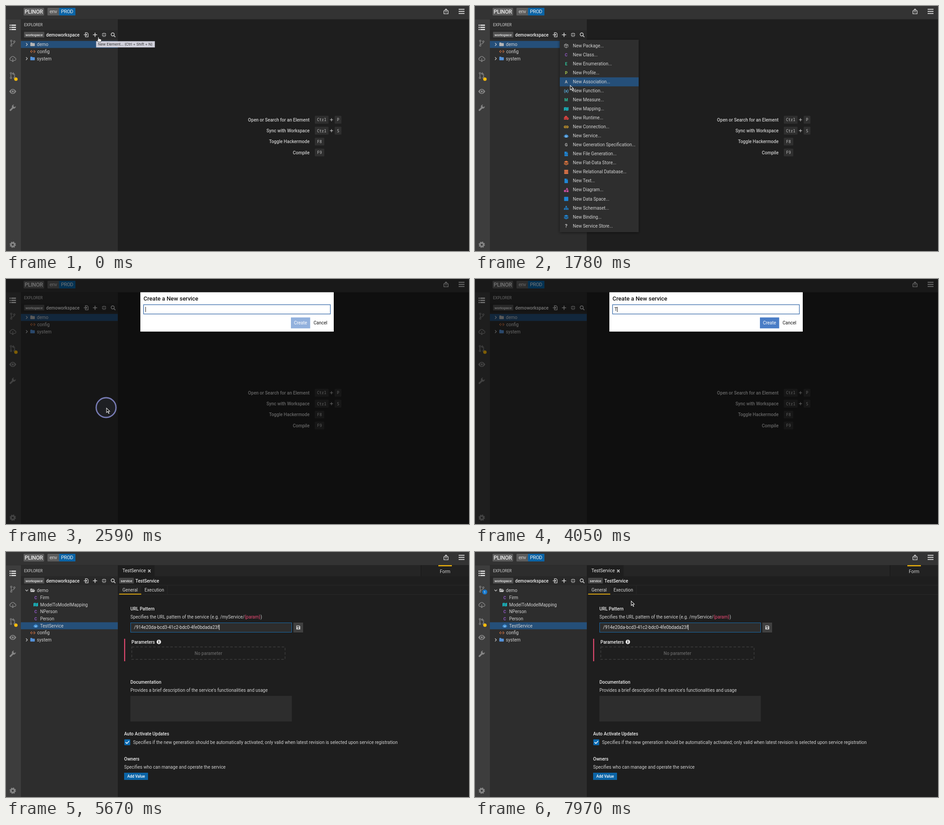
These frames come from a looping animation (1027x545 px, 8 s). An HTML page:

```html
<!DOCTYPE html>
<html lang="en">
<head>
<meta charset="utf-8">
<title>New service</title>
<style>
html, body { margin: 0; width: 100%; height: 100%; overflow: hidden; background: #1e1e1e; }
svg { display: block; width: 100vw; height: 100vh; font-family: Roboto, "Noto Sans", sans-serif; }
.line { fill: none; stroke-linecap: round; stroke-linejoin: round; }
.mono { font-family: "Noto Sans Mono", "DejaVu Sans Mono", monospace; }
.tip { font-family: Inter, "Liberation Sans", sans-serif; }
</style>
</head>
<body>
<svg id="stage" viewBox="0 0 1027 545" preserveAspectRatio="none"></svg>
<script>
const LOOP = 8000, STEP = 80;
const TEXT = '#d2d2d2', BLUE = '#1f86d6', YELLOW = '#fdbc0b';
const stage = document.getElementById('stage');

// Markup helpers
const attrs = o => Object.entries(o).map(([k, v]) => ` ${k}="${v}"`).join('');
const rect = (x, y, w, h, fill, o = {}) =>
  `<rect${attrs({ x, y, width: w, height: h, fill, ...o })}/>`;
const text = (x, y, s, o = {}) =>
  `<text${attrs({ x, y, 'font-size': 10, fill: TEXT, ...o })}>${s}</text>`;
const bold = (x, y, s, o = {}) => text(x, y, s, { 'font-weight': 500, fill: '#ececec', ...o });
const mid = (x, y, s, o = {}) => text(x, y, s, { 'text-anchor': 'middle', ...o });
const circle = (cx, cy, r, fill, o = {}) => `<circle${attrs({ cx, cy, r, fill, ...o })}/>`;
const shape = (d, fill) => `<path d="${d}" fill="${fill}"/>`;
const line = (d, stroke, w = 1, o = {}) =>
  `<path class="line"${attrs({ d, stroke, 'stroke-width': w, ...o })}/>`;
const at = (x, y, body) => `<g transform="translate(${x} ${y})">${body}</g>`;
const layer = (id, body) => `<g id="${id}">${body}</g>`;

// Icons, each drawn around 0,0
const letter = (s, fill, size = 9) => mid(0, 3.3, s, { fill, 'font-size': size, 'font-weight': 700 });
const folder = fill => shape('M-5 -3.2q0-1 1-1h2.6l1.3 1.3h4q1 0 1 1v4.6q0 1-1 1h-8q-1 0-1-1z', fill);
const openFolder = shape('M-5 3V-3.3q0-.8.8-.8h2.8l1.2 1.2h3q.9 0 .9.9v.6h-6.4L-4 3zM-2 -.7H5.6L3.7 3.6H-4.2z', '#c4c4c4');
const chevron = down => line(down ? 'M-2.6 -1.3L0 1.4 2.6 -1.3' : 'M-1.2 -2.8L1.5 0 -1.2 2.8', TEXT, 1.2);
const code = line('M-2.4 -2.6L-5 0l2.6 2.6M2.4 -2.6L5 0 2.4 2.6M-1 0h2', '#d97642', 1.2);
const map = shape('M-5 -3l3-1.2v7.4L-5 4.4zM-1.5 -4.2l3 1.2v7.4l-3-1.2zM2 -3l3-1.2v7.4L2 4.4z', '#19b4bd');
const robot = rect(-3.6, -2.4, 7.2, 6.2, '#3b8fd8', { rx: 1.2 }) + rect(-5.2, -.6, 1.1, 3, '#3b8fd8') +
  rect(4.1, -.6, 1.1, 3, '#3b8fd8') + rect(-.5, -4.2, 1, 2, '#3b8fd8') +
  circle(-1.6, .2, .8, '#e4edf5') + circle(1.6, .2, .8, '#e4edf5') + rect(-2, 2, 4, .8, '#e4edf5');
const cube = line('M0 -4.4L4 -2.3V2.3L0 4.4-4 2.3V-2.3zM-4 -2.3L0 -.2 4 -2.3M0 -.2V4.4M-2 -3.4L2 -1.2', '#b8b8b8', .9);
const runtime = shape('M-5 0q0-2 2-2v-1.2q0-1.2 1.2-1.2h2.6q1.2 0 1.2 1.2V-2q1 0 1.5 1L0 0v.8h-5zM-5 1.5h5v2.3h-5z', '#dc4340') +
  circle(2.8, 1.7, 2.7, '#dc4340') + rect(2.4, .2, .8, 2, '#2d2d2d');
const link = line('M-.8 -2H-2.4a2 2 0 0 0 0 4H-.8M.8 -2H2.4a2 2 0 0 1 0 4H.8M-1.8 0h3.6', '#e7ad2c', 1.3);
const file = shape('M-3.8 -5h4.8v2.8h2.8V5h-7.6zM1.7 -5l2.1 2.1H1.7z', BLUE);
const codeFile = file + line('M-1.2 0L-2.5 1.3-1.2 2.6M1.2 0L2.5 1.3 1.2 2.6', '#2d2d2d', .8);
const stack = fill => shape('M0 -4.8L5 -2.4 0 0-5 -2.4z', fill) +
  line('M-4.4 .2L0 2.2 4.4 .2M-4.4 2.4L0 4.5 4.4 2.4', fill, 1.3);
const barrel = [-4.6, -1.4, 1.8].map(y => rect(-4.6, y, 9.2, 2.7, '#ee7a4a', { rx: 1.3 })).join('');
const shapes = shape('M1.8 -5L4.8 -.4H-1.2z', '#c950a0') + circle(-2.6, 2.4, 2.5, '#c950a0') + rect(.8, .7, 4.2, 4.2, '#c950a0');
const square = rect(-4.6, -4.6, 9.2, 9.2, BLUE, { rx: .8 });
const tree = [[-1.4, -4.4], [-5, 1.3], [-1.4, 1.3], [2.2, 1.3]].map(([x, y]) => rect(x, y, 2.8, 2.8, BLUE)).join('') +
  line('M0 -2V2M-3.6 1.5V0h7.2v1.5', BLUE, .9);

const MENU = [
  ['Package', cube], ['Class', letter('C', '#9358c6')], ['Enumeration', letter('E', '#2fc79c')],
  ['Profile', letter('P', '#a9c74f')], ['Association', letter('A', '#bcbcbc')],
  ['Function', letter('(x)', '#5bb4e6', 8.5)], ['Measure', letter('M', '#2dc5a1')], ['Mapping', map],
  ['Runtime', runtime], ['Connection', link], ['Service', robot],
  ['Generation Specification', letter('G', '#bcbcbc')], ['File Generation', codeFile],
  ['Flat-Data Store', stack('#e8793f')], ['Relational Database', barrel], ['Text', file],
  ['Diagram', shapes], ['Data Space', square], ['Schemaset', tree], ['Binding', stack(BLUE)],
  ['Service Store', letter('?', '#c4c4c4', 11)]
];
const ROW = 20.03, MENU_TOP = 78.6;

// Fixed surroundings
const GREY = '#858585';
const gear = circle(0, 0, 4, 'none', { stroke: GREY, 'stroke-width': 3.4 }) +
  circle(0, 0, 6, 'none', { stroke: GREY, 'stroke-width': 2, 'stroke-dasharray': '2.5 2.212' });
const eye = shape('M-7.8 0Q-4.5 -5.6 0 -5.6T7.8 0Q4.5 5.6 0 5.6T-7.8 0z', GREY) +
  circle(0, 0, 3.7, '#3d3d3d') + circle(0, 0, 2.2, GREY);
const wrench = line('M-5.2 5.2L1.6 -1.6', GREY, 3.6) +
  shape('M6.6 -3.8A4.4 4.4 0 1 1 3 -7L.9 -4.6 1.5 -1.9 4.3 -1.4z', GREY);
const branch = line('M-3.4 -3V4M3.4 -1.8Q3.4 1.8 -3.2 2.4', GREY, 1.3) +
  [[-3.4, -5], [-3.4, 5.4], [3.4, -3.4]].map(([x, y]) => circle(x, y, 1.7, 'none', { stroke: GREY, 'stroke-width': 1.3 })).join('');
const pull = line('M-4 -3V3.5M4 3.5V-2Q4 -4 2 -4H-.2M1.6 -6.2L-.6 -4 1.6 -1.8', GREY, 1.4) +
  [[-4, -5], [-4, 5.3], [4, 5.3]].map(([x, y]) => circle(x, y, 1.7, 'none', { stroke: GREY, 'stroke-width': 1.3 })).join('');
const cloud = line('M-3 3H-4A2.9 2.9 0 0 1 -4.4 -2.7 4.6 4.6 0 0 1 4.3 -2.8 2.9 2.9 0 0 1 4 3H3M0 -1V5.6M-2.1 3.6L0 5.8 2.1 3.6', GREY, 1.4);
const list = [-4.8, 0, 4.8].map(y => rect(-7, y - 1.1, 2.2, 2.2, '#fff') + rect(-3.5, y - 1.1, 10.6, 2.2, '#fff')).join('');

const tools = at(178, 64, line('M-2 -2V-4.6H2L4.2 -2.4V4.6H-2V2M-5 0H1.2M-.6 -1.9L1.4 0 -.6 1.9', TEXT, 1.3)) +
  at(197.5, 64, line('M-4 0H4M0 -4V4', TEXT, 1.7)) +
  at(217.5, 64, line('M-4.2 -1.6h2.6v-2.6M4.2 -1.6H1.6v-2.6M-4.2 1.6h2.6v2.6M4.2 1.6H1.6v2.6', TEXT, 1.2)) +
  at(237.5, 64, circle(-.8, -.8, 3.4, 'none', { stroke: TEXT, 'stroke-width': 1.5 }) + line('M1.8 1.8L4.6 4.6', TEXT, 1.6));

const chrome = rect(0, 0, 1027, 545, '#1e1e1e') + rect(0, 0, 1027, 29.5, '#333') +
  rect(0, 29.5, 33, 516, '#3d3d3d') + rect(33, 29.5, 215, 516, '#2d2d2d') + rect(33, 54, 215, 20, '#282828') +
  rect(39, 4, 45.5, 17, '#5c5c5c', { rx: 1.5 }) +
  bold(41.3, 16.6, 'PLINOR', { 'font-size': 12, 'letter-spacing': -.25 }) +
  rect(92, 4, 62, 17, '#5c5c5c', { rx: 1.5 }) + rect(117.5, 4, 36.5, 17, '#0b64a6', { rx: 1.5 }) +
  text(96.7, 16.2, 'env', { 'font-size': 11, 'letter-spacing': -.25 }) +
  text(122, 16.4, 'PROD', { 'font-size': 11, 'letter-spacing': -.4, fill: '#eee' }) +
  at(976, 12, line('M-2.5 -1.5H-4.6V5.4H4.6V-1.5H2.5M0 2V-5.4M-2.4 -3.2L0 -5.6 2.4 -3.2', TEXT, 1.4)) +
  [7.4, 12, 16.6].map(y => rect(1004, y - 1, 13, 2, TEXT)).join('') +
  at(15, 47.5, list) + at(15, 82.5, branch) + at(15, 118, cloud) + at(15, 154.5, pull) +
  circle(22, 162.7, 3.8, YELLOW) + at(15, 190, eye) + at(15, 226.5, wrench) + at(15, 531, gear) +
  text(40, 45, 'EXPLORER', { 'font-size': 8.57 }) +
  rect(40, 57.5, 45, 12.5, '#505050', { rx: 1 }) + bold(43.2, 66.6, 'workspace', { 'font-size': 7.86 }) +
  bold(89, 67.6, 'demoworkspace') + tools;

// Explorer tree
const rowY = i => 85.5 + i * 15.72;
const leaf = (i, x, icon, label) => at(x, rowY(i), icon) + text(x + 9.7, rowY(i) + 3.6, label);
const node = (i, icon, label, open) => at(46, rowY(i), chevron(open)) + at(59, rowY(i), icon) + text(68.6, rowY(i) + 3.6, label);
const picked = i => rect(33, rowY(i) - 7.8, 215, 15.6, '#254f79');
const C = letter('C', '#9358c6');
const closedTree = picked(0) + node(0, folder('#b5b5b5'), 'demo') + leaf(1, 59.5, code, 'config') + node(2, folder('#5491d8'), 'system');
const openTree = picked(5) + node(0, openFolder, 'demo', true) + leaf(1, 66, C, 'Firm') +
  leaf(2, 66, map, 'ModelToModelMapping') + leaf(3, 66, C, 'NPerson') + leaf(4, 66, C, 'Person') +
  leaf(5, 66, robot, 'TestService') + leaf(6, 59.5, code, 'config') + node(7, folder('#5491d8'), 'system');

// Empty editor with shortcuts
const key = (x, y, w, s) => rect(x, y - 8.7, w, 17.4, '#2f2f2f', { rx: 1.5 }) +
  mid(x + w / 2, y + 3.4, s, { class: 'mono', 'font-size': 8.57, fill: '#c4c4c4' });
const shortcut = (i, label, ...keys) => {
  const y = 253 + i * 24.3;
  return bold(673.3, y + 3.6, label, { 'text-anchor': 'end', fill: '#cacaca' }) +
    key(685, y, keys[1] ? 30.5 : 21, keys[0]) +
    (keys[1] ? line(`M719 ${y}h6M722 ${y - 3}v6`, '#c4c4c4', 1.2) + key(729, y, 15, keys[1]) : '');
};
const welcome = shortcut(0, 'Open or Search for an Element', 'Ctrl', 'P') +
  shortcut(1, 'Sync with Workspace', 'Ctrl', 'S') + shortcut(2, 'Toggle Hackermode', 'F8') + shortcut(3, 'Compile', 'F9');

// Service form
const form = rect(248, 29.5, 779, 24.5, '#252525') + rect(248, 29.5, 81.5, 24.5, '#1e1e1e') +
  rect(920, 29.5, 1, 24.5, '#171717') + rect(921, 29.5, 106, 24.5, '#212121') +
  rect(959, 29.3, 30, 2.4, YELLOW) + mid(974, 47, 'Form') +
  text(258.3, 45.4, 'TestService', { fill: '#ececec' }) + line('M315.6 39.8l4.6 4.6M320.2 39.8l-4.6 4.6', '#eee', 1.5) +
  rect(251, 57.5, 32.5, 12.5, '#474747', { rx: 1 }) + bold(254.6, 66.6, 'service', { 'font-size': 7.86 }) +
  bold(287, 67.6, 'TestService') + rect(248, 73.5, 779, 1, '#2b2b2b') + rect(248, 94, 779, 1, '#292929') +
  rect(251, 74.5, 49, 19.5, '#242424') + rect(251, 92.8, 49, 1.7, YELLOW) +
  text(258.3, 87.7, 'General') + text(307.3, 87.7, 'Execution') + rect(357.5, 75, 1, 19, '#282828') +
  bold(276, 130, 'URL Pattern') +
  text(276, 148, 'Specifies the URL pattern of the service (e.g. /myService/<tspan fill="#ea4a74">{param}</tspan>)') +
  rect(276.5, 157.5, 357, 21, '#2d2d2d', { stroke: '#1a6bab' }) +
  text(284, 171.4, '/914e20da-bcd3-41c2-bdc0-4fe0bdada23f', { id: 'url', fill: '#e4e4e4' }) +
  rect(637.5, 157, 21.5, 22, '#404040') +
  at(648.3, 168, shape('M-4.3 -4.3H2.4L4.3 -2.4V4.3H-4.3z', '#cfcfcf') + rect(-3, -3, 5, 2.2, '#404040') + circle(0, 1.7, 1.4, '#404040')) +
  rect(262, 193, 2.3, 50, '#e0486f') + bold(278.3, 203.8, 'Parameters') +
  circle(339, 200, 4.9, '#e6e6e6') + mid(339, 203, 'i', { 'font-size': 8.5, 'font-weight': 900, fill: '#1e1e1e' }) +
  rect(279, 211.2, 340, 27.6, 'none', { stroke: '#3c3c3c', 'stroke-width': 1.5, 'stroke-dasharray': '5.5 4' }) +
  mid(449, 228.7, 'No parameter', { fill: '#626262', 'font-weight': 500 }) +
  bold(276, 293, 'Documentation') + text(276, 311, "Provides a brief description of the service's functionalities and usage") +
  rect(276, 320, 358, 57, '#2d2d2d') +
  bold(262, 407.6, 'Auto Activate Updates') + rect(262.5, 416.7, 13, 13, '#0b6bb3', { rx: 1 }) +
  line('M265.6 423.4l2.5 2.5 4.6-5', '#fff', 1.5) +
  text(281.8, 426.8, 'Specifies if the new generation should be automatically activated; only valid when latest revision is selected upon service registration') +
  bold(262, 464, 'Owners') + text(262, 482, 'Specifies who can manage and operate the service') +
  rect(262, 491, 53, 16, '#0b64a6') + mid(288.5, 501.9, 'Add Value', { 'font-size': 8.57, 'font-weight': 500, fill: '#fff' }) +
  rect(0, 162, 1, 11.5, '#fff', { id: 'urlCaret' });

const menu = rect(188, 75, 175, 428, '#2d2d2d', { filter: 'url(#shadow)' }) +
  rect(188, 0, 175, ROW, '#254f79', { id: 'hover' }) +
  MENU.map(([label, icon], i) => {
    const y = MENU_TOP + (i + .5) * ROW;
    return at(202.3, y, icon) + text(217, y + 3.4, `New ${label}...`);
  }).join('');

const dark = { fill: '#111' };
const dialog = rect(0, 0, 1027, 545, '#000', { opacity: .5 }) +
  rect(298, 29.5, 429, 87.5, '#fff', { filter: 'url(#shadow)' }) +
  bold(305, 47.6, 'Create a New service', { 'font-size': 12.86, ...dark }) +
  rect(305.2, 57.2, 414.3, 20.6, '#fff', { stroke: '#4373ae', 'stroke-width': 1.4 }) +
  text(309.2, 71.4, '', { id: 'typed', ...dark }) + rect(0, 62, 1, 11.5, '#111', { id: 'caret' }) +
  rect(632, 85.5, 42.7, 24.3, '#4a7dc6', { id: 'create' }) + mid(653.3, 101.2, 'Create', { fill: '#fff' }) +
  text(682.3, 101.2, 'Cancel', dark) +
  layer('hints', rect(305, 80.5, 137, 0, '#fff', { id: 'hintBox', rx: 3, stroke: '#c8c8c8', 'stroke-width': .7 }) +
    ['TestService', 'TestModel', 'TestMapping'].map((s, i) => text(315, 101.3 + i * 24, s, { class: 'hint', ...dark })).join(''));

const pointer = shape('M0 0V12.2L2.9 9.6 4.8 13.8 6.9 12.9 5 8.8H8.8z', '#fff') + shape('M1 2.3V10L3.1 8 5.1 12.4 5.6 12.2 3.6 7.9H6.5z', '#111');
const hand = `<path d="M0 1q0-1 1-1t1 1v3q1.6-.6 2 .4 1.4-.4 1.8.6 1.5-.2 1.5 1.2v2.2l-1.2 2.6H1.2L-1.7 7.2q-.5-1.2.7-1.2L0 6.8z" fill="#fff" stroke="#111" stroke-width=".7"/>`;

stage.innerHTML = '<defs><filter id="shadow" x="-10%" y="-20%" width="120%" height="140%">' +
  '<feDropShadow dx="0" dy="1" stdDeviation="3" flood-opacity=".55"/></filter></defs>' +
  chrome + layer('before', closedTree + welcome) + layer('after', openTree + form) +
  layer('badge', circle(21.7, 89, 5.6, '#1878cc') + mid(21.7, 91.7, '1', { 'font-size': 7.5, fill: '#fff' })) +
  layer('menu', menu) + layer('dialog', dialog) +
  layer('tip', rect(200, 78.5, 130, 13.5, '#d0d0db', { stroke: '#aeb0bd', 'stroke-width': .5 }) +
    text(204, 88.2, 'New Element... (Ctrl + Shift + N)', { class: 'tip', 'font-size': 8, fill: '#333' })) +
  circle(0, 0, 0, 'rgba(160,165,220,.07)', { id: 'ring', stroke: '#8287c6', 'stroke-width': 2.8 }) +
  layer('hand', hand) + layer('arrow', pointer);

const el = {};
stage.querySelectorAll('[id]').forEach(e => el[e.id] = e);
const hintRows = stage.querySelectorAll('.hint');
const show = (e, on) => { e.style.display = on ? '' : 'none'; };

// Start, end, from and to of each pointer move
const MOVES = [
  { kind: 'hand', t0: 0, t1: 1060, start: 500, end: 900, from: [204, 69], to: [200, 64] },
  { kind: 'arrow', t0: 1380, t1: 4050, start: 1300, end: 2260, from: [199, 65], to: [222.5, 286] },
  { kind: 'arrow', t0: 7410, t1: LOOP, start: 7410, end: 7970, from: [222.5, 286], to: [346, 108] }
];
const CLICKS = [{ t: 980, end: 1300, x: 200, y: 64 }, { t: 2510, end: 3390, x: 222, y: 286 }];
const KEYS = [4050, 4130, 4290, 4370, 4700, 4860, 5020, 5100, 5180, 5260, 5420];
const NAME = 'TestService';

const ease = p => p * p * (3 - 2 * p);
const between = (t, a, b) => t >= a && t < b;

function place(m, t) {
  const stepped = Math.floor((t - m.start) / STEP) * STEP;
  const p = ease(Math.min(1, Math.max(0, stepped / (m.end - m.start))));
  return m.from.map((v, i) => v + (m.to[i] - v) * p);
}

function drawPointer(t) {
  const move = MOVES.find(m => between(t, m.t0, m.t1));
  show(el.hand, move && move.kind === 'hand');
  show(el.arrow, move && move.kind === 'arrow');
  if (!move) return show(el.hover, false);
  const [x, y] = place(move, t);
  el[move.kind].setAttribute('transform', `translate(${x} ${y})`);
  const row = Math.floor((y - MENU_TOP) / ROW);
  show(el.hover, row >= 0);
  el.hover.setAttribute('y', MENU_TOP + row * ROW);
}

function drawRing(t) {
  const click = CLICKS.find(c => between(t, c.t, c.end));
  show(el.ring, click);
  if (!click) return;
  const age = Math.floor((t - click.t) / STEP) * STEP - STEP;
  el.ring.setAttribute('cx', click.x);
  el.ring.setAttribute('cy', click.y);
  el.ring.setAttribute('r', age < 0 ? 13.5 : 12 + 10 * Math.exp(-age / 220));
  el.ring.setAttribute('opacity', age < 0 ? 1 : .9 * Math.exp(-age / 130));
}

function drawDialog(t) {
  const count = KEYS.filter(k => t >= k).length;
  el.typed.textContent = NAME.slice(0, count);
  el.caret.setAttribute('x', 309.2 + (count ? el.typed.getComputedTextLength() : 0));
  show(el.caret, !between(t, 3070, 3550));
  el.create.setAttribute('opacity', count ? 1 : .6);
  const hints = count < 2 || count === NAME.length ? 0 : count < 5 ? 3 : 1;
  show(el.hints, hints);
  el.hintBox.setAttribute('height', 11 + hints * 24.5);
  hintRows.forEach((h, i) => show(h, i < hints));
}

function draw(t) {
  const done = t >= 5670, asking = between(t, 2590, 5670);
  show(el.before, !done);
  show(el.after, done);
  show(el.badge, t >= 6580);
  show(el.tip, t < 980);
  show(el.menu, between(t, 1060, 2590));
  show(el.dialog, asking);
  if (asking) drawDialog(t);
  if (done) {
    el.urlCaret.setAttribute('x', 284.2 + el.url.getComputedTextLength());
    show(el.urlCaret, !between(t, 6170, 6580) && !between(t, 7160, 7570));
  }
  drawPointer(t);
  drawRing(t);
}

const begin = performance.now();
function tick() {
  draw((performance.now() - begin) % LOOP);
  requestAnimationFrame(tick);
}
tick();
</script>
</body>
</html>
```
